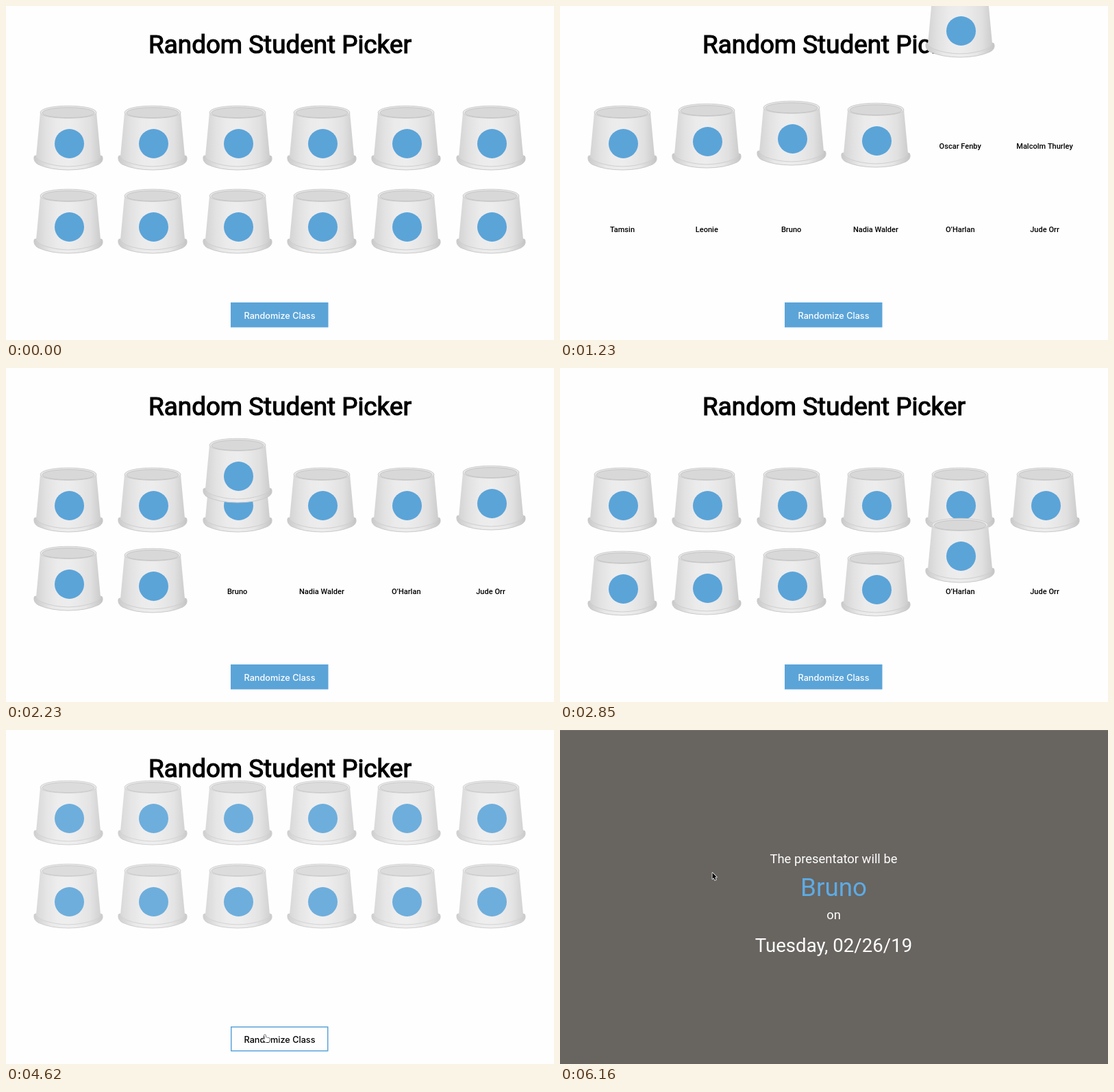
Recreate the animation shown at these times as an HTML page with a canvas. Size 800 px wide and 489 px high, loop 7.24 s.

```html
<!DOCTYPE html>
<html lang="en">
<head>
<meta charset="utf-8">
<title>Random Student Picker</title>
<style>
  html, body { margin: 0; height: 100%; overflow: hidden; background: #fefefe; }
  canvas { display: block; width: 800px; height: 489px; }
</style>
</head>
<body>
<canvas id="stage" width="800" height="489"></canvas>
<script>
const LOOP = 7240, STEP = 76.9;
const BLUE = '#5ba4d8', PAPER = '#fefefe';
const PICKED = 'Bruno', PICKED_CUP = 1;
const STUDENTS = [
  'Diana Pell', 'Lukas Rowe', 'Colin Hadley', 'Ivor', 'Oscar Fenby', 'Malcolm Thurley',
  'Tamsin', 'Leonie', PICKED, 'Nadia Walder', 'O’Harlan', 'Jude Orr'
];
// Fall, brake and rebound of a cup: [time, y offset]
const DROP = [[0, -1376], [770, -99], [860, -38], [940, -13], [980, -4], [1040, 1.5],
              [1080, 2], [1190, -8], [1290, -4.5], [1480, -3], [1640, 0]];
// Cursor path: [time, x, y]
const PATH = [[3460, 98, 45], [3540, 175, 93], [3690, 331, 330], [3920, 377, 446],
              [5160, 377, 446], [5390, 222, 209]];

const ctx = document.getElementById('stage').getContext('2d');
const clamp = v => Math.max(0, Math.min(1, v));
const mix = (a, b, u) => a + (b - a) * u;
const columnX = i => 91 + (i % 6) * 123.3;
const rowY = i => i < 6 ? 146 : 268;

function along(keys, t, column = 1) {
  const next = keys.findIndex(key => key[0] > t);
  if (next === 0) return keys[0][column];
  if (next < 0) return keys[keys.length - 1][column];
  const a = keys[next - 1], b = keys[next];
  return mix(a[column], b[column], (t - a[0]) / (b[0] - a[0]));
}

function text(string, x, y, size, color, family = 'Roboto', weight = 400) {
  ctx.font = `${weight} ${size}px ${family}, sans-serif`;
  ctx.textAlign = 'center';
  ctx.fillStyle = color;
  ctx.fillText(string, x, y);
}

// Cup sprite; its local origin is the middle of the cup's top edge.
function makeCup() {
  const sprite = document.createElement('canvas');
  sprite.width = 108;
  sprite.height = 100;
  const c = sprite.getContext('2d');
  c.translate(54, 1);

  const shade = (x, stops) => {
    const g = c.createLinearGradient(-x, 0, x, 0);
    stops.forEach((color, i) => g.addColorStop(i / (stops.length - 1), color));
    return g;
  };
  const shape = (path, fill, stroke) => {
    const p = new Path2D(path);
    c.fillStyle = fill;
    c.fill(p);
    if (stroke) { c.strokeStyle = stroke; c.stroke(p); }
  };
  const body = shade(48, ['#d3d3d4', '#e2e2e3', '#ebebec', '#ededee', '#e8e8e9', '#e0e0e1', '#cbcbcc']);
  const lip = shade(50, ['#c9c9ca', '#e8e8e9', '#eeeeef', '#e6e6e7', '#c4c4c5']);

  shape('M-50 75Q-50 73-47 73L47 73Q50 73 50 76Q51 82 44 86Q26 94 0 94Q-26 94-44 86Q-51 82-50 75Z', lip, '#c8c8c9');
  shape('M-41 10L-47 74Q-45 79-38 82Q-22 88.5 0 89Q22 88.5 38 82Q45 79 47 74L41 10Z', body);
  c.strokeStyle = '#cfcfd0';
  c.stroke(new Path2D('M-47 75Q-45 79-38 82Q-22 88.5 0 89Q22 88.5 38 82Q45 79 47 75'));
  shape('M-41 10C-40-3 40-3 41 10C40 21-40 21-41 10Z', '#e8e8e8', '#cbcbcb');
  shape('M-38 10.5C-36 0 36 0 38 10.5C36 20-36 20-38 10.5Z', '#d8d8d9', '#c4c4c4');

  c.fillStyle = BLUE;
  c.beginPath();
  c.arc(1.5, 55.5, 21.5, 0, 7);
  c.fill();
  return sprite;
}
const cup = makeCup();

function lift(elapsed) {
  const e = Math.max(0, elapsed);
  return { y: -72 * (e / 160) ** 1.6, alpha: 1 - clamp(e / 470) ** 2 };
}

function cupPose(i, t) {
  if (t < STEP || t > 3500 && t < 4400) return { y: 0, alpha: 1 };
  if (t < 4400) return { y: along(DROP, t - 250 * (i - 2)), alpha: 1 };
  if (t < 5000) return lift(t - 4454);
  if (t > 5460 && i === PICKED_CUP) return lift(t - 5460);
  return { y: 0, alpha: clamp((t - 5080) / 300) };
}

function drawButton(hover) {
  ctx.fillStyle = BLUE;
  ctx.fillRect(328, 434, 142.5, 36.5);
  ctx.globalAlpha = hover;
  ctx.fillStyle = PAPER;
  ctx.fillRect(329.5, 435.5, 139.5, 33.5);
  ctx.globalAlpha = 1;
  const ink = Math.round(255 * (1 - hover));
  text('Randomize Class', 399.5, 457.5, 12.7, `rgb(${ink},${ink},${ink})`, 'Inter', 500);
}

function drawCursor(x, y, hand) {
  const outline = hand
    ? 'M0 1Q1-1 2 1L2.5 4L7 5Q8.500 5.500 8 8L7 11L1.500 11L-2 7Q-3 5.500-1 6L.5 7Z'
    : 'M0 0L0 9L2 7.200L3.600 10.800L5.200 10.100L3.600 6.600L6.400 6.500Z';
  const p = new Path2D(outline);
  ctx.save();
  ctx.translate(x, y);
  ctx.lineJoin = 'round';
  ctx.lineWidth = hand ? 1.2 : 1.6;
  ctx.strokeStyle = hand ? '#222' : '#fff';
  ctx.fillStyle = hand ? '#fff' : '#000';
  ctx.stroke(p);
  ctx.fill(p);
  ctx.restore();
}

function drawClass(t) {
  ctx.fillStyle = PAPER;
  ctx.fillRect(0, 0, 800, 489);

  // Regular weight thickened by an outline, as a synthetic bold.
  text('Random Student Picker', 400, 69, 36.8, '#000');
  ctx.lineWidth = 1.2;
  ctx.strokeStyle = '#000';
  ctx.strokeText('Random Student Picker', 400, 69);

  const hover = clamp((t - 3880) / 350) * (1 - clamp((t - 5090) / 280));
  drawButton(hover);

  const nameAt = (i, name) => text(name, columnX(i), rowY(i) + 62.5, 11.04, '#000', 'Roboto', 500);
  if (t >= STEP && t < 4000) STUDENTS.forEach((name, i) => nameAt(i, name));
  if (t > 5460) nameAt(PICKED_CUP, PICKED);

  STUDENTS.forEach((_, i) => {
    const pose = cupPose(i, t);
    ctx.globalAlpha = pose.alpha;
    ctx.drawImage(cup, Math.round(columnX(i)) - 54, Math.round(rowY(i) + pose.y) - 1);
  });
  ctx.globalAlpha = 1;

  if (t > 3450) {
    const overCup = t > 5370 && t < 5700;
    drawCursor(along(PATH, t, 1), along(PATH, t, 2), hover > 0.1 || overCup);
  }
}

function drawResult() {
  ctx.fillStyle = '#686460';
  ctx.fillRect(0, 0, 800, 489);
  ctx.fillStyle = '#777470';
  ctx.fillRect(0, 0, 800, 1);
  text('The presentator will be', 399.5, 195, 18.4, '#fff');
  text(PICKED, 399.5, 243, 36.8, '#5dabe4');
  text('on', 399.5, 277, 18.4, '#fff');
  text('Tuesday, 02/26/19', 399.5, 324.5, 27.6, '#fff');
  drawCursor(222.5, 209, false);
}

const start = performance.now();
function render() {
  const t = (performance.now() - start) % LOOP;
  // The scene advances in held steps, like a screen recording.
  if (t >= 6160) drawResult();
  else drawClass(Math.floor(t / STEP + 0.1) * STEP);
  requestAnimationFrame(render);
}
render();
</script>
</body>
</html>
```
